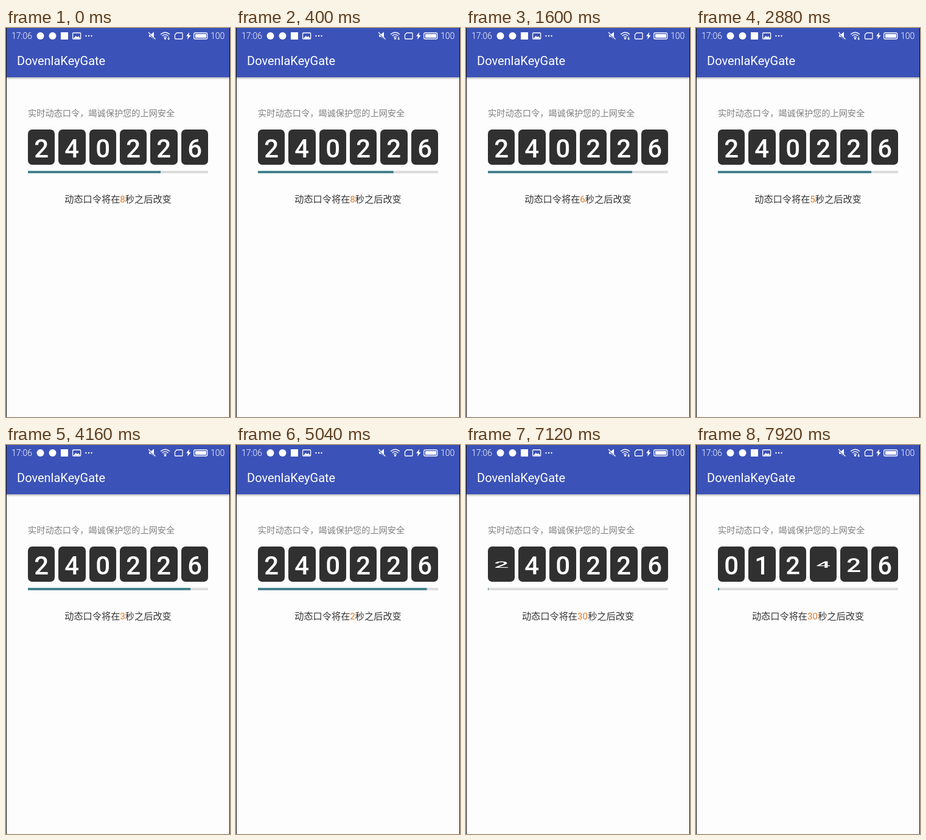
An HTML page for the animation above (8000 ms loop, 368 by 640 pixels).

```html
<!DOCTYPE html>
<html lang="zh-CN">
<head>
<meta charset="utf-8">
<title>动态口令</title>
<style>
  html, body { margin: 0; width: 100%; height: 100%; overflow: hidden; background: #fdfdfd; }
  body { position: relative; font-family: Roboto, "Noto Sans CJK SC", "Noto Sans CJK", sans-serif; }
  svg { position: absolute; left: 0; top: 0; display: block; }
  .tile {
    position: absolute; top: 167px; width: 44.4px; height: 58px;
    border-radius: 7px; background: #303030; overflow: hidden;
  }
  .tile span {
    display: block; height: 58px; line-height: 64px; text-align: center;
    font-size: 42px; font-weight: 500; color: #fff;
  }
</style>
</head>
<body>
<svg width="368" height="640" viewBox="0 0 368 640">
  <defs>
    <linearGradient id="shade" x2="0" y2="1">
      <stop offset="0" stop-color="#000" stop-opacity=".28"/>
      <stop offset="1" stop-color="#000" stop-opacity="0"/>
    </linearGradient>
  </defs>

  <rect width="368" height="81" fill="#3b52b8"/>
  <rect y="81" width="368" height="4" fill="url(#shade)"/>

  <!-- status bar -->
  <g fill="#fff" font-size="14" font-weight="300">
    <text x="9" y="18">17:06</text>
    <text x="336" y="18">100</text>
    <circle cx="56.5" cy="13" r="6"/>
    <circle cx="76.5" cy="13" r="6"/>
    <rect x="90" y="7" width="12" height="12"/>
    <path d="M111 17l3.5-4 2.5 2 2-1.5 3 3.5z"/>
    <circle cx="131.5" cy="13" r="1.2"/>
    <circle cx="136" cy="13" r="1.2"/>
    <circle cx="140.5" cy="13" r="1.2"/>
    <path d="M235 10.5h3l5-4v12l-5-4h-3z"/>
    <path d="M301 7l-5 6.5h3l-1 5.5 5.5-7h-3z"/>
    <rect x="311" y="10" width="18" height="6"/>
    <circle cx="261.5" cy="17.3" r="1.6"/>
    <path id="link" d="M266.5 14.5h1.3v3h1.6l-2.2 2.3-2.2-2.3h1.5z"/>
  </g>
  <path d="M233.5 7l11.5 12" stroke="#3b52b8" stroke-width="2.4"/>
  <g fill="none" stroke="#fff" stroke-width="1.3">
    <path d="M234 7l11.5 11.5"/>
    <rect x="109.6" y="8" width="13" height="10" rx="1"/>
    <path d="M254 10.5q7.5-6.5 15 0M256.5 13q5-4.2 10 0M259 15.3q2.5-2 5 0"/>
    <path d="M280.5 8h8.5q1 0 1 1v8q0 1-1 1h-10.5q-1 0-1-1v-6z"/>
    <rect x="308.7" y="8" width="22" height="10" rx="2"/>
  </g>

  <text x="18" y="61" font-size="20" fill="#fff">DovenlaKeyGate</text>
  <text x="36" y="145.4" font-size="14.2" fill="#808080">实时动态口令，竭诚保护您的上网安全</text>

  <rect x="36" y="235" width="296" height="4" fill="#dcdcdc"/>
  <rect id="bar" x="36" y="235" height="4" fill="#43818d"/>

  <text x="184" y="287.4" font-size="15.2" fill="#333" text-anchor="middle">动态口令将在<tspan id="secs" fill="#e27a22">8</tspan>秒之后改变</text>

  <path d="M.5 0V640M367.5 0V640" stroke="#111"/>
</svg>

<script>
  const LOOP = 8000, RESET = 6640, FULL = 296;
  const FLIP_START = 6746, FLIP_TIME = 880, STAGGER = 224;
  const oldCode = '240226', newCode = '012426';

  const byId = id => document.getElementById(id);
  const bar = byId('bar'), secs = byId('secs'), link = byId('link');

  const digits = [...oldCode].map((d, i) => {
    const tile = document.createElement('div');
    const span = document.createElement('span');
    tile.className = 'tile';
    tile.style.left = 36 + i * 50.35 + 'px';
    tile.append(span);
    document.body.append(tile);
    return span;
  });

  const clamp = v => Math.min(1, Math.max(0, v));
  const ease = u => (1 - Math.cos(Math.PI * u)) / 2;
  const within = (t, a, b) => t >= a && t < b;

  function flip(span, i, t) {
    const angle = 180 * ease(clamp((t - FLIP_START - i * STAGGER) / FLIP_TIME));
    const turned = angle > 90;
    span.textContent = (turned ? newCode : oldCode)[i];
    span.style.transform = `perspective(600px) rotateX(${turned ? angle - 180 : angle}deg)`;
  }

  function render(t) {
    const width = t < RESET
      ? Math.min(FULL, 218 + t * 0.0118)
      : 0.3 + (t - RESET) * 0.0014;
    bar.setAttribute('width', width);
    secs.textContent = t < RESET ? Math.max(1, Math.ceil(30 - width / FULL * 30)) : 30;
    const idle = within(t, 3000, 4300) || within(t, 4900, 5500);
    link.style.visibility = idle ? 'hidden' : 'visible';
    digits.forEach((span, i) => flip(span, i, t));
  }

  const start = performance.now();
  function tick() {
    render((performance.now() - start) % LOOP);
    requestAnimationFrame(tick);
  }
  render(0);
  requestAnimationFrame(tick);
</script>
</body>
</html>
```
